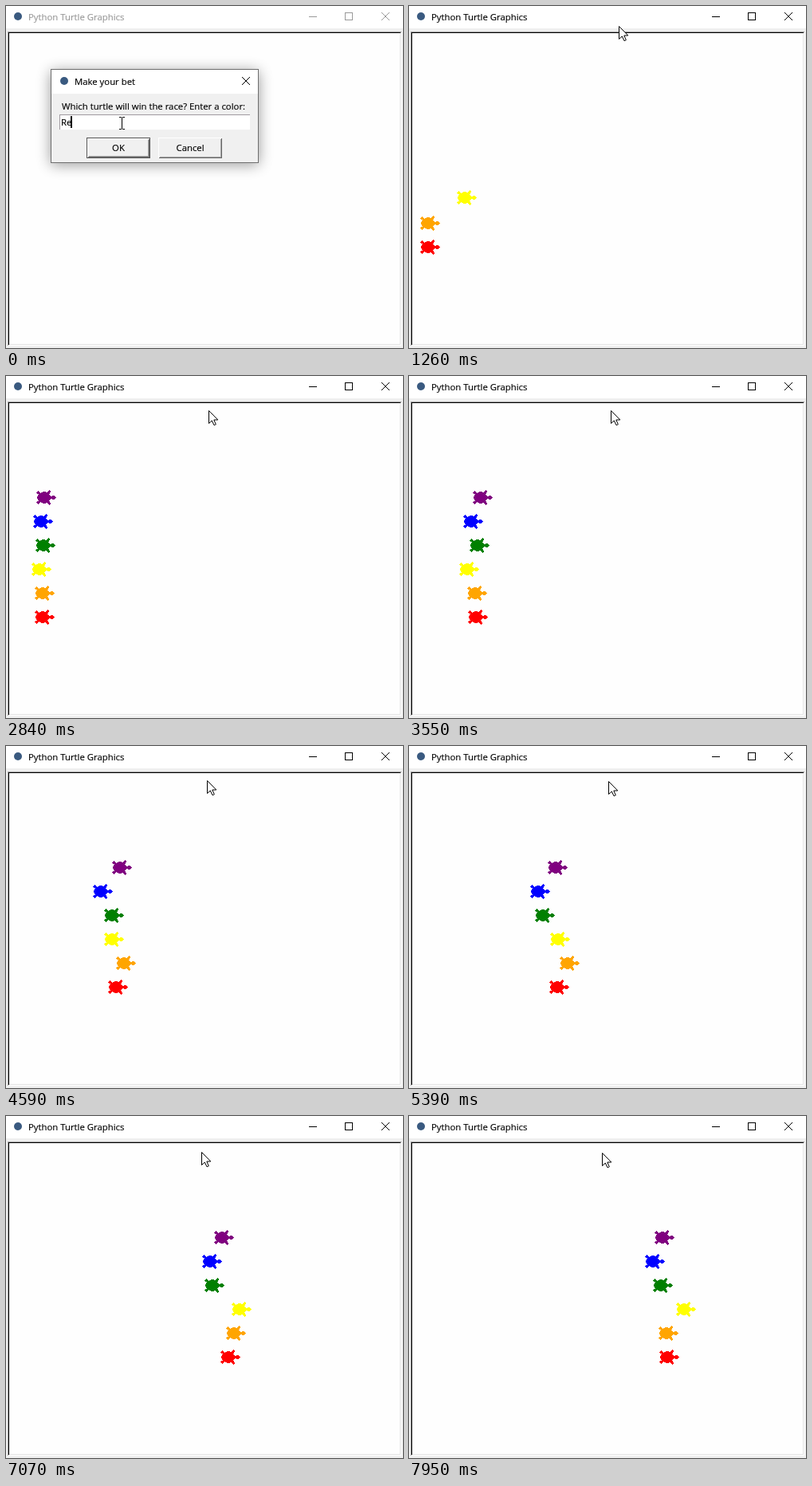
Animation of 498 by 429 pixels, one loop 8000 ms. Source, as an HTML page:

```html
<!DOCTYPE html>
<html lang="en">
<head>
<meta charset="utf-8">
<title>Turtle race</title>
<style>
  html, body { margin: 0; width: 100%; height: 100%; overflow: hidden; background: #f0f0f0; }
  svg { display: block; width: 498px; height: 429px; }
  text {
    font: 11.35px "Open Sans", "Noto Sans", sans-serif;
    white-space: pre; stroke: currentColor; stroke-width: .15px; fill: currentColor;
  }
  .crisp { shape-rendering: crispEdges; }
  .mid { text-anchor: middle; }
</style>
</head>
<body>
<svg id="stage" viewBox="0 0 498 429">
  <defs>
    <filter id="soft" x="-20%" y="-40%" width="140%" height="180%"><feGaussianBlur stdDeviation="9"/></filter>
  </defs>

  <rect width="498" height="429" fill="#f0f0f0"/>
  <rect width="498" height="28" fill="#fff"/>
  <circle cx="15" cy="13" r="5" fill="#3a5a80"/>
  <g id="titlebar">
    <text x="28" y="18">Python Turtle Graphics</text>
    <g fill="none" stroke="currentColor">
      <path class="crisp" d="M380 13.5h10M425.5 8.5h9v9h-9z"/>
      <path d="M471 8l10 10m0-10l-10 10"/>
    </g>
  </g>
  <g class="crisp">
    <rect x="2" y="32" width="494" height="394" fill="#fff"/>
    <rect x="3" y="33" width="492" height="392" fill="#e3e3e3"/>
    <rect x="4" y="34" width="490" height="390" fill="#fefefe"/>
    <path d="M2.5 426V32.5H496" fill="none" stroke="#a0a0a0"/>
    <path d="M3.5 425V33.5H495" fill="none" stroke="#000"/>
  </g>

  <g id="turtles" class="crisp"></g>

  <g id="dialog">
    <rect x="56" y="82" width="261" height="117" opacity=".4" filter="url(#soft)"/>
    <g class="crisp">
      <rect x="56.5" y="79.5" width="260" height="117" fill="#f0f0f0" stroke="#6e6e6e"/>
      <rect x="57" y="80" width="259" height="30" fill="#fff"/>
      <rect x="67" y="136" width="239" height="19" fill="#fff"/>
      <path d="M67.5 155V136.5H306" fill="none" stroke="#a09aa0"/>
    </g>
    <circle cx="73" cy="94" r="5" fill="#3a5a80"/>
    <path d="M296 89l10 10m0-10l-10 10" stroke="#000"/>
    <text x="86" y="99">Make your bet</text>
    <text x="70" y="130">Which turtle will win the race? Enter a color:</text>
    <text id="entry" x="69" y="150"></text>
    <rect id="caret" class="crisp" y="138" width="2" height="15"/>
    <g id="buttons"></g>
  </g>

  <path id="beam" class="crisp" d="M142 139.5h3m1 0h3M142 154.5h3m1 0h3M145.5 140v14" fill="none" stroke="#000"/>
  <path id="arrow" d="M.5 .5V16.5L4.3 13L7 18.7L9.3 17.7L6.8 12H11.8Z" fill="#fff" stroke="#000"/>
</svg>

<script>
const LOOP = 8000, TYPED = 80, CLOSE = 230, FIRST_BORN = 205;
const HOP = 17.2, HOP_LENGTH = 12;
const HOME = { x: 252, y: 232 }, START_X = 22, FIRST_LANE = 302, LANE_GAP = 30;
const el = id => document.getElementById(id);

// Upper half of the body, from nose to tail; the lower half mirrors it.
const HALF = [[16, 0], [14, -2], [10, -1], [7, -4], [9, -7], [8, -9], [5, -6],
  [1, -7], [-3, -5], [-6, -8], [-8, -6], [-5, -4], [-7, 0]];
const BODY = [...HALF, ...HALF.slice(1, -1).reverse().map(([x, y]) => [x, -y])];

// Distance each racer has run at the checkpoints.
const CHECKPOINTS = [3550, 4590, 6190, 7950];
const RUNS = {
  red:    [60, 114, 209, 300],
  orange: [59, 124, 225, 299],
  yellow: [49, 109, 217, 321],
  green:  [62, 109, 178, 292],
  blue:   [54, 95, 181, 282],
  purple: [66, 119, 200, 294]
};

// Pointer keys: time, x, y.
const POINTER = [[230, 145, 140], [1020, 270, 15], [1260, 262, 26],
  [2050, 255, 43], [4590, 252, 43], [7950, 242, 46]];

// Linear path through keys of the form [time, ...values].
function follow(keys, t) {
  const next = Math.max(1, keys.findIndex(key => key[0] >= t));
  const [from, to] = [keys[next - 1], keys[next]];
  const p = Math.max(0, (t - from[0]) / (to[0] - from[0]));
  return from.slice(1).map((v, i) => v + (to[i + 1] - v) * p);
}

function make(parent, tag, attrs, label = "") {
  const node = document.createElementNS("http://www.w3.org/2000/svg", tag);
  for (const key in attrs) node.setAttribute(key, attrs[key]);
  node.textContent = label;
  return parent.appendChild(node);
}

function place(node, x, y) {
  node.setAttribute("transform", `translate(${Math.round(x)} ${Math.round(y)})`);
}

function show(node, on) {
  node.setAttribute("visibility", on ? "visible" : "hidden");
}

function button(x, label, isDefault) {
  const g = make(el("buttons"), "g", { class: "crisp", fill: "none" });
  const inset = isDefault ? 1 : 0;
  const l = x + inset + .5, t = 165.5 + inset, r = x + 79.5 - inset, b = 190.5 - inset;
  make(g, "path", { d: `M${l} ${b}V${t}H${r}`, stroke: "#fff" });
  make(g, "path", { d: `M${l + 1} ${b - 1}H${r - 1}V${t + 1}`, stroke: "#a0a0a0" });
  make(g, "path", { d: `M${l} ${b}H${r}V${t}`, stroke: "#696969" });
  if (isDefault) make(g, "rect", { x: x + .5, y: 165.5, width: 79, height: 25, stroke: "#555" });
  make(g, "text", { x: x + 40, y: 182, class: "mid" }, label);
}

// The turtles are created one after another; each hops from home to its lane.
function createRacers() {
  let born = FIRST_BORN;
  const racers = Object.keys(RUNS).map((color, i) => {
    const lane = FIRST_LANE - LANE_GAP * i;
    const distance = Math.hypot(HOME.x - START_X, HOME.y - lane);
    const hops = 1 + Math.floor(distance / HOP_LENGTH);
    const node = make(el("turtles"), "polygon", { points: BODY.join(" "), fill: color, stroke: color });
    const racer = { color, lane, born, hops, node };
    born += (hops + 1) * HOP;
    return racer;
  });
  for (const racer of racers) {
    racer.keys = [[born, 0], ...CHECKPOINTS.map((time, i) => [time, RUNS[racer.color][i]])];
  }
  return racers;
}

function moveRacer({ node, lane, born, hops, keys }, t) {
  show(node, t >= CLOSE && t >= born);
  const p = Math.max(0, Math.min(1, Math.floor((t - born) / HOP) / hops));
  const [run] = follow(keys, t);
  const x = HOME.x + (START_X - HOME.x) * p + run;
  const y = HOME.y + (lane - HOME.y) * p;
  node.setAttribute("transform", `translate(${Math.round(x) + .5} ${Math.round(y) + .5})`);
}

// The screen refreshes every 80 ms, counted back from the last refresh.
function refreshTime(t) {
  if (t < CLOSE) return t;
  return Math.max(CLOSE, 7950 - Math.ceil((7950 - t) / 80) * 80);
}

function draw(now) {
  const t = Math.min(7950, refreshTime(now % LOOP));
  const asking = t < CLOSE;
  el("titlebar").setAttribute("color", asking ? "#999" : "#000");
  show(el("dialog"), asking);
  show(el("beam"), asking);
  show(el("arrow"), !asking);
  el("entry").textContent = t < TYPED ? "Re" : "Red";
  el("caret").setAttribute("x", t < TYPED ? 81 : 88);
  racers.forEach(racer => moveRacer(racer, t));
  place(el("arrow"), ...follow(POINTER, t));
}

button(101, "OK", true);
button(191, "Cancel", false);
const racers = createRacers();
const begin = performance.now();

function tick() {
  draw(performance.now() - begin);
  requestAnimationFrame(tick);
}
tick();
</script>
</body>
</html>
```
